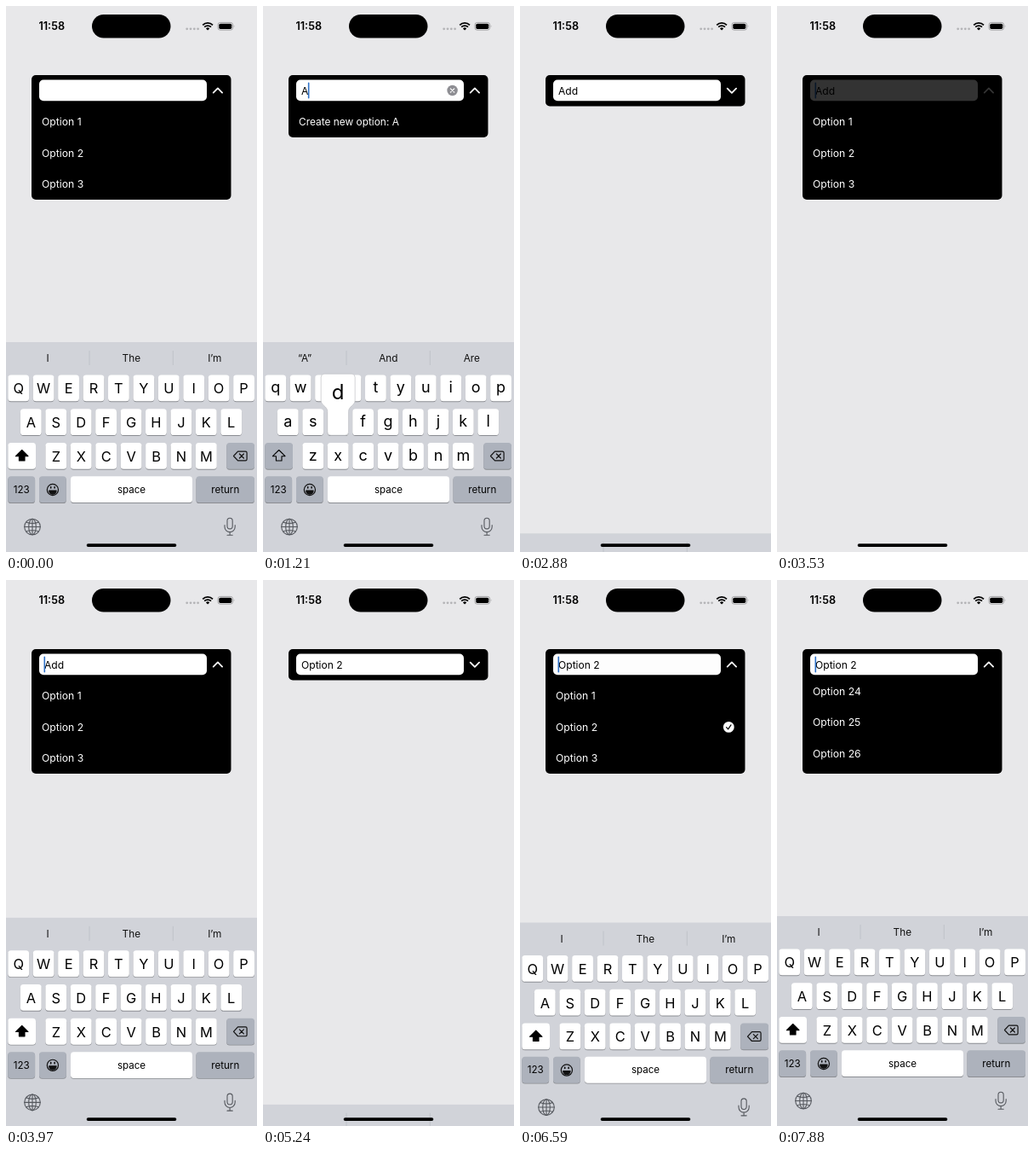
Recreate the animation shown at these times as an HTML page. Size 295 by 640 pixels, loop 7.99 s.

```html
<!DOCTYPE html>
<html lang="en">
<head>
<meta charset="utf-8">
<title>Creatable dropdown</title>
<style>
html, body { margin: 0; width: 100%; height: 100%; overflow: hidden; background: #e8e8ea; }
svg { display: block; width: 100vw; height: 100vh; font-family: Inter, "Liberation Sans", sans-serif; }
</style>
</head>
<body>
<svg id="stage" viewBox="0 0 295 640">
  <defs>
    <clipPath id="listClip"><rect x="30" y="117.5" width="234.5" height="109.5"/></clipPath>
  </defs>
  <rect width="295" height="640" fill="#e8e8ea"/>

  <g id="status">
    <text x="38.4" y="28.2" font-size="12.7" font-weight="600">11:58</text>
    <rect x="101" y="10" width="92.5" height="27.5" rx="13.75"/>
    <g fill="#b4b4b7">
      <circle cx="212.7" cy="26.8" r="1.4"/><circle cx="217" cy="26.8" r="1.4"/>
      <circle cx="221.3" cy="26.8" r="1.4"/><circle cx="225.6" cy="26.8" r="1.4"/>
    </g>
    <g fill="none" stroke="#000" stroke-width="1.8">
      <path d="M231.2 22.3a8.4 8.4 0 0 1 11.8 0M233.2 24.7a5.5 5.5 0 0 1 7.8 0"/>
    </g>
    <path d="M237.1 28.6l-2.1-2.2a3 3 0 0 1 4.2 0z"/>
    <rect x="249" y="19.4" width="17.6" height="8.8" rx="2.7" fill="none" stroke="#929295" stroke-width=".8"/>
    <rect x="250.3" y="20.7" width="15" height="6.2" rx="1.6"/>
    <path d="M267.8 22.3q1.3 1.5 0 3z" fill="#929295"/>
  </g>

  <rect id="panel" x="30" y="81" width="234.5" height="146" rx="5"/>
  <g id="list" clip-path="url(#listClip)" fill="#fff" font-size="12.2">
    <g id="rows"></g>
    <g id="check">
      <circle cx="245.3" r="6.4"/>
      <path d="M242.6 .3l2 2.2 3.4-5" fill="none" stroke="#000" stroke-width="1.2" stroke-linecap="round" stroke-linejoin="round"/>
    </g>
  </g>
  <text id="create" x="42" y="140" fill="#fff" font-size="11.9"></text>

  <g id="header">
    <rect x="39" y="86.5" width="197" height="24.7" rx="5" fill="#fff"/>
    <rect id="mark" x="43.5" y="90" height="18" fill="#b3d4f8"/>
    <text id="value" x="45" y="103.7" font-size="12.1"></text>
    <rect id="caret" y="89.6" width="1.6" height="19" rx=".8" fill="#2f72c8"/>
    <g id="clear">
      <circle cx="222.6" cy="99" r="6.2" fill="#8e8e93"/>
      <path d="M220.4 96.8l4.4 4.4m0-4.4l-4.4 4.4" stroke="#fff" stroke-width="1.2" stroke-linecap="round"/>
    </g>
    <path id="chevron" fill="none" stroke="#fff" stroke-width="1.8" stroke-linecap="round" stroke-linejoin="round"/>
  </g>

  <g id="keyboard">
    <rect y="394" width="295" height="256" fill="#d1d3d9"/>
    <path id="dividers" d="M98 404v17M196.3 404v17" stroke="#bcbfc6" stroke-width=".8"/>
    <rect id="best" x="98.4" y="398.5" width="97.6" height="28.5" rx="4" fill="#eceef1"/>
    <g id="words" font-size="11.8" text-anchor="middle" fill="#111"></g>
    <g id="keys" text-anchor="middle"></g>
    <path id="shift" d="M18.7 520.5l7.3 7.2h-4v5.3h-6.6v-5.3h-4z" stroke="#000" stroke-width="1.1" stroke-linejoin="round"/>
    <g fill="none" stroke="#111" stroke-width="1.2" stroke-linecap="round" stroke-linejoin="round">
      <path d="M267.5 527.5l5-5.4h9q1.6 0 1.6 1.6v7.6q0 1.6-1.6 1.6h-9zM274.4 525l5 5m0-5l-5 5"/>
      <circle cx="54.9" cy="567" r="6.6"/>
      <path d="M50.7 568h8.4a4.2 4.2 0 0 1-8.4 0z" fill="#111"/>
      <path d="M52.7 563.7v1.3m4.4-1.3v1.3" stroke-width="1.6"/>
    </g>
    <g fill="none" stroke="#55585e" stroke-width="1.1" stroke-linecap="round">
      <circle cx="31" cy="610.5" r="9.3"/>
      <ellipse cx="31" cy="610.5" rx="4.3" ry="9.3"/>
      <path d="M31 601.2v18.6M21.7 610.5h18.6M23.6 605q7.4 3 14.8 0M23.6 616q7.4-3 14.8 0"/>
      <rect x="260" y="600.3" width="6.2" height="12.6" rx="3.1"/>
      <path d="M257 608.5v2a6.1 6.1 0 0 0 12.2 0v-2M263.1 616.7v3.4M260 620.3h6.2"/>
    </g>
    <g id="popup">
      <path fill="#fff" stroke="#b6b8bd" stroke-width=".6"/>
      <text font-size="24" text-anchor="middle" y="-11"></text>
    </g>
  </g>
  <rect x="94.7" y="630.2" width="105.6" height="3.8" rx="1.9"/>
</svg>
<script>
const LOOP = 7990, ROW = 36.7, KB = 246;
const $ = id => document.getElementById(id);
const clamp = x => Math.max(0, Math.min(1, x));
const ramp = (t, a, b) => clamp((t - a) / (b - a));
const smooth = x => x * x * (3 - 2 * x);
const show = (el, on) => el.setAttribute('display', on ? 'inline' : 'none');

function add(parent, tag, attrs, text) {
  const el = document.createElementNS('http://www.w3.org/2000/svg', tag);
  for (const k in attrs) el.setAttribute(k, attrs[k]);
  if (text) el.textContent = text;
  parent.appendChild(el);
  return el;
}

function key(x, y, w, fill, label) {
  const box = { x, width: w, height: 30.8, rx: 3.6 };
  add($('keys'), 'rect', { ...box, y: y + .9, fill: '#8b8d92' });
  const face = add($('keys'), 'rect', { ...box, y, fill });
  if (label) add($('keys'), 'text', { x: x + w / 2, y: y + 19.4, 'font-size': 11.6 }, label);
  return face;
}

const GREY = '#adb2bc', letters = {};
[['QWERTYUIOP', 14.7, 432.5], ['ASDFGHJKL', 29.3, 472.2], ['ZXCVBNM', 58.8, 512]].forEach(([row, x0, y]) => {
  [...row].forEach((ch, i) => {
    const x = x0 + i * 29.43;
    key(x - 12.4, y, 24.8, '#fff');
    letters[ch] = { x, y, el: add($('keys'), 'text', { x }) };
  });
});
const shiftKey = key(2.3, 512, 32.7, '#fff');
key(259.2, 512, 32.8, GREY);
key(2.3, 551.3, 31.8, GREY, '123');
key(39, 551.3, 31.8, GREY);
key(76, 551.3, 143, '#fff', 'space');
key(223.5, 551.3, 68.5, GREY, 'return');

const words = [49, 147.3, 245.3].map(x => add($('words'), 'text', { x, y: 417 }));
const rows = Array.from({ length: 5 }, () => add($('rows'), 'text', { x: 42 }));
$('popup').firstElementChild.setAttribute('d',
  'M-20-37q0-4 4-4h32q4 0 4 4v27c0 6-7.6 7-7.6 13v24q0 4-4 4h-16.8q-4 0-4-4v-24c0-6-7.6-7-7.6-13z');

const PRESSES = [['A', 850, 980], ['D', 1200, 1330], ['G', 1690, 1840]];

// Damped spring used when the keyboard slides
function spring(ms) {
  const x = Math.max(0, ms) * .0183;
  return 1 - (1 + x) * Math.exp(-x);
}

function keyboardDrop(t) {
  if (t < 2660) return 0;
  if (t < 3590) return KB * spring(t - 2660);
  if (t < 5030) return KB * (1 - spring(t - 3590));
  if (t < 6300) return KB * spring(t - 5030);
  return KB * (1 - spring(t - 6300));
}

function headerOpacity(t) {
  const dip = (down, up) => t < up ? 1 - .8 * ramp(t, down, down + 100) : .2 + .8 * smooth(ramp(t, up, up + 320));
  return t < 5000 ? dip(3400, 3590) : dip(6125, 6290);
}

function caretOpacity(t) {
  if (t >= 850 && t < 2660) return 1;
  const start = t < 850 ? -765 : t < 5030 ? 3590 : 6300;
  const p = t < start ? 0 : (t - start) % 1000;
  return p < 870 ? 1 - ramp(p, 690, 750) : ramp(p, 870, 1000);
}

function scrollTop(t) {
  const flick = u => 1 - Math.exp(-Math.max(0, u - 6760) / 330);
  return 849.2 * flick(t) / flick(7880);
}

function predictions(t) {
  if (t > 2660 && t < 3400 || t > 5030 && t < 6200) return ['', '', ''];
  if (t < 1000 || t > 3400) return ['I', 'The', 'I’m'];
  if (t < 1450) return ['“A”', 'And', 'Are'];
  if (t < 2040) return ['“Ad”', 'Add', 'Advice'];
  return ['“Adg”', 'Add', 'Advice'];
}

function draw(t) {
  const open = t < 2660 || t >= 3500 && t < 5030 || t >= 6230;
  const typed = t < 980 || t >= 2660 ? '' : t < 1330 ? 'A' : t < 1840 ? 'Ad' : 'Adg';
  const upper = t < 1000 || t > 3400;
  const chosen = t >= 5030;

  $('panel').setAttribute('height', !open ? 36.5 : typed ? 73 : 146);
  show($('list'), open && !typed);
  show($('create'), typed);
  $('create').textContent = 'Create new option: ' + typed;
  $('create').setAttribute('opacity', 1 - .8 * ramp(t, 2410, 2530));

  const top = scrollTop(t), first = Math.floor(top / ROW);
  rows.forEach((el, i) => {
    el.textContent = 'Option ' + (first + i + 1);
    el.setAttribute('y', 139.9 + (first + i) * ROW - top);
  });
  show($('check'), chosen);
  $('check').setAttribute('transform', `translate(0 ${172.4 - top})`);

  $('header').setAttribute('opacity', headerOpacity(t));
  $('value').textContent = typed || (t < 2660 ? '' : chosen ? 'Option 2' : 'Add');
  const end = typed ? $('value').getComputedTextLength() : 0;
  $('caret').setAttribute('x', 44.5 + end);
  $('caret').setAttribute('opacity', open ? caretOpacity(t) : 0);
  const marked = t >= 2190 && t < 2660;
  show($('mark'), marked);
  $('mark').setAttribute('width', end + 2);
  show($('clear'), typed);
  $('chevron').setAttribute('d', open ? 'M243.7 101.6l5.2-5.2 5.2 5.2' : 'M243.7 96.6l5.2 5.2 5.2-5.2');

  $('keyboard').setAttribute('transform', `translate(0 ${keyboardDrop(t)})`);
  predictions(t).forEach((w, i) => words[i].textContent = w);
  show($('best'), marked);
  show($('dividers'), !marked);
  for (const ch in letters) {
    const { y, el } = letters[ch];
    el.textContent = upper ? ch : ch.toLowerCase();
    el.setAttribute('font-size', upper ? 16.4 : 18);
    el.setAttribute('y', y + (upper ? 21.8 : 20.6));
  }
  shiftKey.setAttribute('fill', upper ? '#fff' : GREY);
  $('shift').setAttribute('fill', upper ? '#000' : 'none');

  const press = PRESSES.find(([, a, b]) => t >= a && t < b);
  show($('popup'), press);
  if (press) {
    const { x, y } = letters[press[0]];
    $('popup').setAttribute('transform', `translate(${Math.max(x, 22)} ${y})`);
    $('popup').lastElementChild.textContent = upper ? press[0] : press[0].toLowerCase();
  }
}

const began = performance.now();
function tick() {
  draw((performance.now() - began) % LOOP);
  requestAnimationFrame(tick);
}
tick();
</script>
</body>
</html>
```
